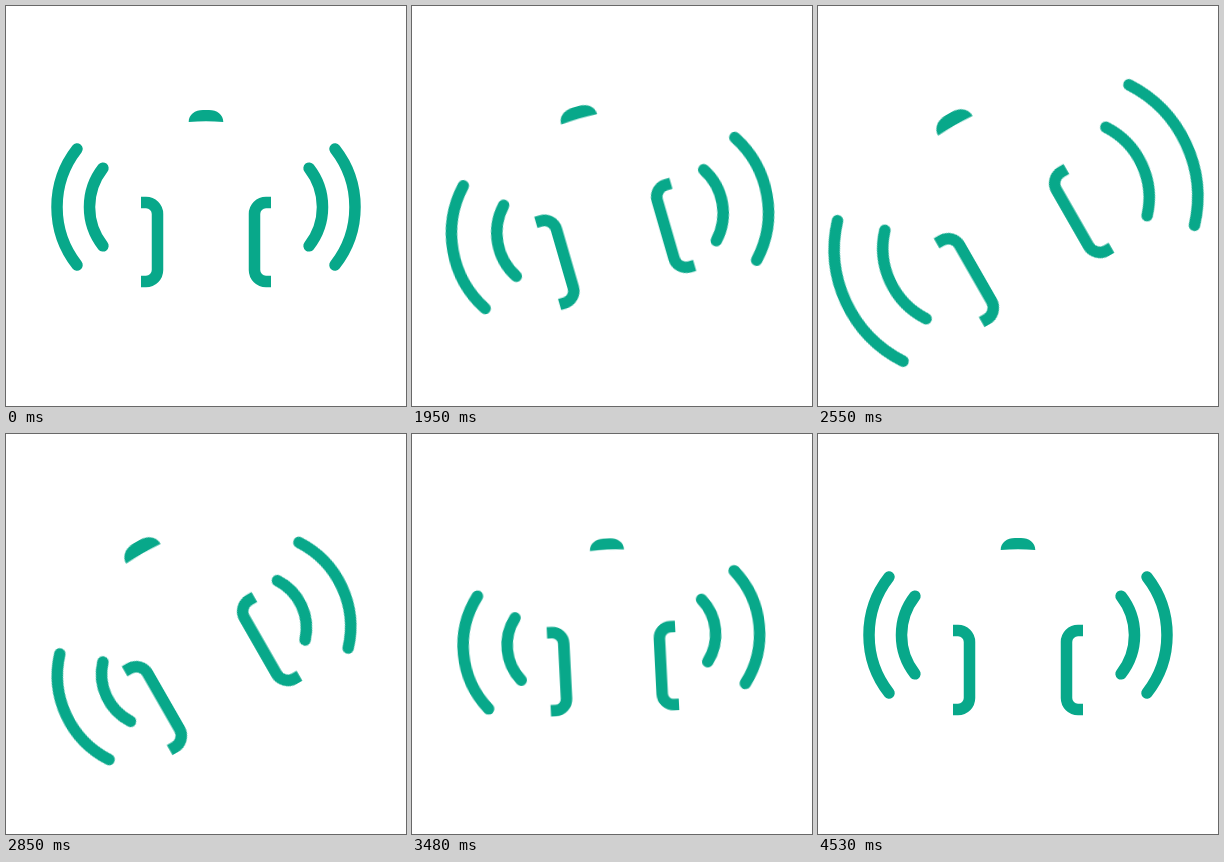
Recreate the animation shown at these times as an HTML page without scripts. Size 400 px wide and 400 px high, loop 4560 ms.

```html
<!DOCTYPE html>
<html lang="en">
<head>
<meta charset="utf-8">
<title>Walkie-talkie</title>
<style>
  html, body { margin: 0; width: 100%; height: 100%; overflow: hidden; background: #fff; }
  svg { display: block; width: 100%; height: 100%; }

  svg * {
    animation-duration: 4560ms;
    animation-iteration-count: infinite;
    animation-timing-function: cubic-bezier(.37, 0, .63, 1);
  }
  .grip, .wave { fill: none; stroke: #08a88a; stroke-width: 11.5; }
  .grip { vector-effect: non-scaling-stroke; }
  .knob { fill: #08a88a; }

  .radio { animation-name: swing; }
  .waves { animation-name: tilt, drift; }

  /* each wave is the visible dash of a full circle */
  .wave { stroke-linecap: round; stroke-dasharray: 76.2 283.8; stroke-dashoffset: 38.1; }
  .inner { animation-name: pulse-inner; }
  .outer { animation-name: pulse-outer; }

  @keyframes swing {
    0%, 33.55%, 95.07%, 100% { transform: translate(200px, 236px) rotate(0deg) scale(1); }
    51.1%, 64.36% { transform: translate(206px, 239.5px) rotate(-29.8deg) scale(1.15); }
    81.9% { transform: translate(199.5px, 233.3px) rotate(5deg) scale(.94); }
  }
  @keyframes tilt {
    0%, 35.09%, 81.9%, 100% { rotate: 0deg; }
    52.63%, 64.36% { rotate: -25deg; }
  }
  @keyframes drift {
    0%, 33.55%, 81.9%, 100% { translate: 200px 201px; }
    42%, 66.9% { translate: 198px 217px; }
  }
  @keyframes pulse-outer {
    0%, 33.55%, 92.8%, 100% { cx: 55px; r: 94px; }
    41%, 52.1%, 63.7%, 75.3% { cx: 57px; r: 91px; }
    46.5%, 57.45%, 69.5% { cx: 63px; r: 133.3px; }
    83.3% { cx: 51px; r: 110px; }
  }
  @keyframes pulse-inner {
    0%, 33.55%, 92.8%, 100% { cx: 53.5px; r: 63px; }
    41%, 52.1%, 63.7%, 75.3% { cx: 54px; r: 50px; }
    46.5%, 57.45%, 69.5% { cx: 61px; r: 85.5px; }
    83.3% { cx: 51px; r: 66px; }
  }
</style>
</head>
<body>
<svg viewBox="0 0 400 400">
  <g class="radio" transform="translate(200 236)">
    <path class="knob" d="M-17.3-120C-17.3-127.500-11-132-3-132H3C11-132 17.3-127.500 17.3-120Q0-121.500-17.3-120Z"/>
    <path class="grip" d="M-65-39.5h5a11.5 11.5 0 0 1 11.5 11.5v56a11.5 11.5 0 0 1-11.5 11.5h-5"/>
    <path class="grip" d="M65-39.5h-5a11.5 11.5 0 0 0-11.5 11.5v56a11.5 11.5 0 0 0 11.5 11.5h5"/>
  </g>
  <g class="waves">
    <g>
      <circle class="wave inner" pathLength="360" cx="53.5" r="63"/>
      <circle class="wave outer" pathLength="360" cx="55" r="94"/>
    </g>
    <g transform="scale(-1 1)">
      <circle class="wave inner" pathLength="360" cx="53.5" r="63"/>
      <circle class="wave outer" pathLength="360" cx="55" r="94"/>
    </g>
  </g>
</svg>
</body>
</html>
```
